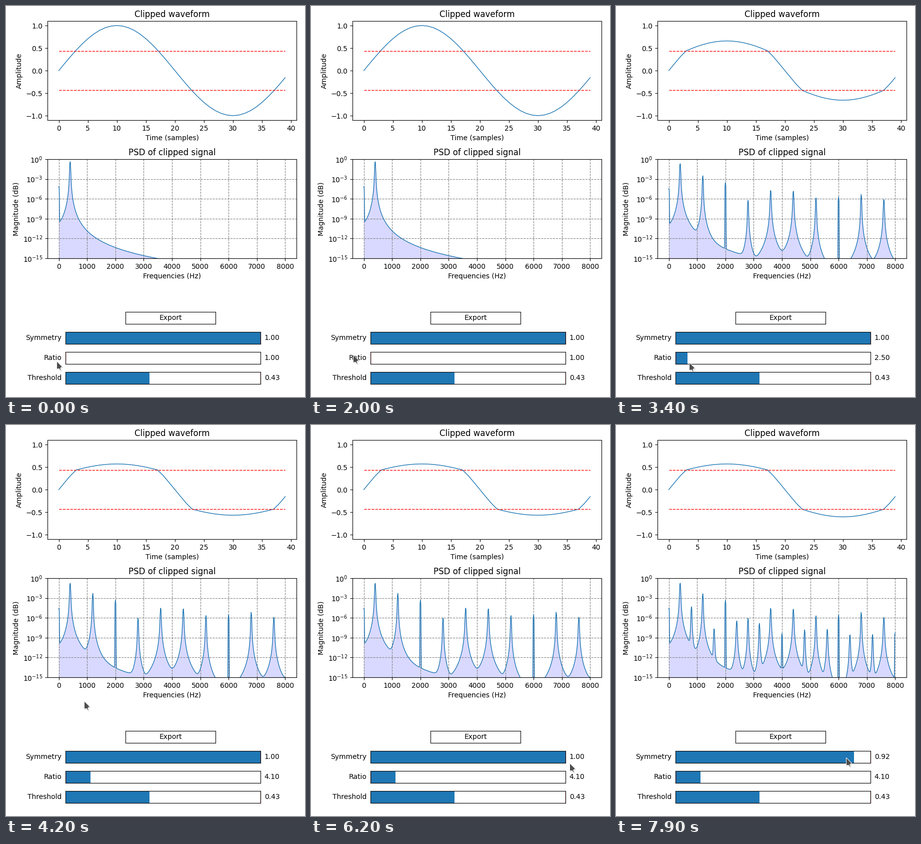
Animation, 598 px wide and 781 px high, one loop 8000 ms. Source, as a matplotlib script:

```python
import numpy as np
import matplotlib.pyplot as plt
from matplotlib.animation import FuncAnimation
from matplotlib.patches import Polygon, Rectangle

W, H, DPI = 598, 781, 100
FRAMES, INTERVAL = 80, 100
RATE, PERIOD, SEGMENT = 16000, 40, 1024
THRESHOLD = 0.43

plt.rcParams.update({"font.family": "DejaVu Sans", "font.size": 10})
fig = plt.figure(figsize=(W / DPI, H / DPI), dpi=DPI, facecolor="white")


def pixel_axes(left, top, width, height, **kwargs):
    return fig.add_axes([left / W, 1 - (top + height) / H, width / W, height / H], **kwargs)


# Signal model
samples = np.arange(PERIOD)
sine = np.sin(2 * np.pi * samples / PERIOD)
freqs = np.fft.rfftfreq(SEGMENT, 1 / RATE)
hann = 0.5 - 0.5 * np.cos(2 * np.pi * np.arange(SEGMENT) / SEGMENT)
# Five half-overlapping segments cover every phase of the periodic signal.
segments = (np.arange(5)[:, None] * SEGMENT // 2 + np.arange(SEGMENT)) % PERIOD


def compress(ratio, symmetry):
    size = np.abs(sine)
    squeezed = np.where(size > THRESHOLD, THRESHOLD + (size - THRESHOLD) / ratio, size)
    squeezed = np.sign(sine) * squeezed
    return np.where(sine < 0, symmetry * squeezed + (1 - symmetry) * sine, squeezed)


def power_spectrum(wave):
    parts = wave[segments]
    parts = (parts - parts.mean(axis=1, keepdims=True)) * hann
    power = np.abs(np.fft.rfft(parts)) ** 2 / hann.sum() ** 2
    power[:, 1:-1] *= 2
    return np.maximum(power.mean(axis=0), 1e-25)


# Waveform plot
wave_ax = pixel_axes(83, 30, 498, 198)
wave_line, = wave_ax.plot(samples, sine, lw=1, color="C0")
for level in (THRESHOLD, -THRESHOLD):
    wave_ax.plot(samples, np.full(PERIOD, level), "r--", lw=1)
wave_ax.set(xlim=(-1.95, 40.95), ylim=(-1.1, 1.1), title="Clipped waveform",
            xlabel="Time (samples)", ylabel="Amplitude",
            xticks=range(0, 41, 5), yticks=np.linspace(-1, 1, 5))

# Spectrum plot
psd_ax = pixel_axes(83, 306, 498, 198)
psd_ax.set_yscale("log")
psd_line, = psd_ax.plot(freqs, power_spectrum(sine), lw=1, color="C0")
psd_fill = Polygon(np.eye(2), fc="blue", ec="none", lw=0, alpha=0.15, zorder=1)
psd_ax.add_patch(psd_fill)
psd_ax.set(xlim=(-400, 8400), ylim=(1e-15, 1), title="PSD of clipped signal",
           xlabel="Frequencies (Hz)", ylabel="Magnitude (dB)",
           xticks=range(0, 8001, 1000), yticks=[10.0 ** e for e in range(-15, 1, 3)])
psd_ax.minorticks_off()
psd_ax.grid(True, color="gray", ls="--")

# Button and sliders
button_ax = pixel_axes(239, 611, 180, 24, xticks=[], yticks=[])
button_ax.text(0.5, 0.5, "Export", ha="center", va="center", transform=button_ax.transAxes)


class Bar:
    def __init__(self, top, label, low, high, initial):
        self.low = low
        ax = pixel_axes(119, top, 390, 24, xticks=[], yticks=[])
        self.fill = ax.add_patch(Rectangle((low, 0), 0, 1, fc="C0", ec="none", lw=0))
        ax.axvline(initial, color="r", lw=1)
        ax.set(xlim=(low, high), ylim=(0, 1))
        ax.text(-0.02, 0.5, label, ha="right", va="center", transform=ax.transAxes)
        self.readout = ax.text(1.02, 0.5, "", ha="left", va="center", transform=ax.transAxes)

    def set(self, value):
        self.fill.set_width(value - self.low)
        self.readout.set_text(f"{value:.2f}")


symmetry_bar = Bar(651, "Symmetry", 0, 1, 1)
ratio_bar = Bar(691, "Ratio", 1, 25, 1)
threshold_bar = Bar(731, "Threshold", 0, 1, 1)
threshold_bar.set(THRESHOLD)

# Mouse pointer
overlay = fig.add_axes([0, 0, 1, 1], xlim=(0, W), ylim=(H, 0), zorder=10)
overlay.axis("off")
ARROW = np.array([(0, 0), (0, 15.5), (4.6, 14.8), (7, 18.6), (8.6, 17.8), (7.2, 13.8), (11, 11)])
shadow = overlay.add_patch(Polygon(ARROW, fc="black", ec="black", lw=1, alpha=0.1))
pointer = overlay.add_patch(Polygon(ARROW, fc="#4d4d4d", ec="white", lw=0.7))

# Pointer path: frame, x, y
PATH = np.array([
    (0, 101, 709), (1, 104, 711), (4, 154, 422), (5, 154, 422), (6, 128, 345),
    (7, 142, 299), (8, 142, 299), (13, 107, 386), (14, 107, 386), (18, 60, 610),
    (20, 84, 696), (28, 123, 710), (31, 129, 709), (38, 169, 715), (42, 156, 551),
    (48, 482, 667), (51, 220, 551), (54, 18, 640), (56, 89, 636), (58, 464, 614),
    (59, 464, 614), (62, 517, 675), (65, 566, 670), (73, 504.5, 662), (79, 460, 664)])


def ramp(frame, start, end):
    return np.clip((frame - start) / (end - start), 0, 1)


def update(frame):
    ratio = 1 + 0.3 * ramp(frame, 30, 31) + 2.8 * ramp(frame, 31, 38)
    symmetry = 1 - 0.0103 * ramp(frame, 72, 73) - 0.0743 * ramp(frame, 73, 79) ** 1.3
    ratio_bar.set(ratio)
    symmetry_bar.set(symmetry)

    wave = compress(ratio, symmetry)
    power = power_spectrum(wave)
    wave_line.set_ydata(wave)
    psd_line.set_ydata(power)
    psd_fill.set_xy([(0, 1e-25), *zip(freqs, power), (freqs[-1], 1e-25)])

    tip = np.array([np.interp(frame, PATH[:, 0], PATH[:, k]) for k in (1, 2)])
    pointer.set_xy(ARROW + tip + 0.5)
    shadow.set_xy(ARROW + tip + 1.5)
    return wave_line, psd_line, psd_fill, pointer, shadow


anim = FuncAnimation(fig, update, frames=FRAMES, interval=INTERVAL, repeat=True, repeat_delay=0)
plt.show()
```
